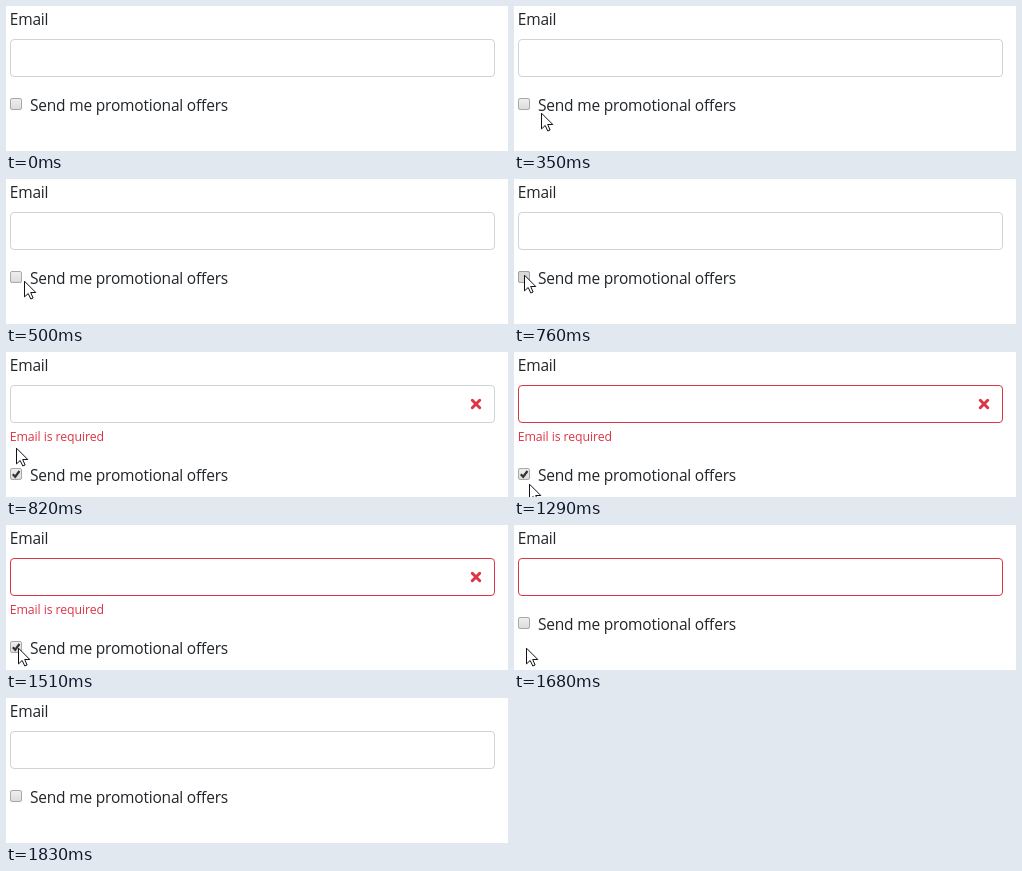
An HTML page that plays this animation: 502x145 px, repeating every 2.67 s.

```html
<!DOCTYPE html>
<html lang="en">
<head>
<meta charset="utf-8">
<title>Email form</title>
<style>
  html, body { margin: 0; width: 100%; height: 100%; overflow: hidden; background: #fff; }
  svg { display: block; width: 502px; height: 145px; }
  text { font: 15.5px "Open Sans", "Noto Sans", sans-serif; letter-spacing: -.2px; fill: #212529; }
  .error text { font-size: 12.3px; letter-spacing: -.1px; fill: #dc3545; }
  .field { fill: #fff; stroke: #ced4da; }
  .cross { stroke: #dc3545; stroke-width: 3; stroke-linecap: round; }
  .box { fill: url(#face); stroke: #a9a9a9; }
  .tick { fill: none; stroke: #333; stroke-width: 2.2; }
  .pointer path { fill: #fff; stroke: #101018; stroke-linejoin: miter; }

  .field, .error, .row, .tick, .pressed, .pointer {
    animation: 2670ms step-end infinite;
  }
  .field { animation-name: border; }
  .error, .tick { animation-name: invalid; }
  .row { animation-name: shift; }
  .pressed { animation-name: press; }
  .pointer { animation-name: move; }

  @keyframes border {
    0% { stroke: #ced4da; }
    33.33% { stroke: #d67c88; }
    36.32% { stroke: #dc3545; }
    65.54% { stroke: #d67c88; }
    68.53%, 100% { stroke: #ced4da; }
  }
  @keyframes invalid {
    0% { visibility: hidden; }
    30.71% { visibility: visible; }
    62.92%, 100% { visibility: hidden; }
  }
  @keyframes shift {
    0% { transform: none; }
    30.71% { transform: translateY(24px); }
    62.92%, 100% { transform: none; }
  }
  @keyframes press {
    0% { visibility: hidden; }
    28.46% { visibility: visible; }
    30.71%, 100% { visibility: hidden; }
  }
  @keyframes move {
    0% { transform: translate(72px, 150px); }
    4.49% { transform: translate(71px, 138px); }
    7.49% { transform: translate(56px, 128px); }
    10.11% { transform: translate(40px, 116px); }
    13.1% { transform: translate(27px, 106px); }
    16.1% { transform: translate(18px, 101px); }
    19.1% { transform: translate(12px, 97px); }
    22.09% { transform: translate(10px, 95px); }
    39.32% { transform: translate(10px, 100px); }
    42.32% { transform: translate(13px, 117px); }
    44.94% { transform: translate(16px, 132px); }
    48.31% { transform: translate(15px, 131px); }
    51.31% { transform: translate(9px, 127px); }
    53.93% { transform: translate(8px, 124px); }
    56.55% { transform: translate(12px, 122px); }
    68.53%, 100% { transform: translate(72px, 150px); }
  }
</style>
</head>
<body>
<svg viewBox="0 0 502 145">
  <defs>
    <linearGradient id="face" x2="0" y2="1">
      <stop stop-color="#efefef"/>
      <stop offset="1" stop-color="#dcdcdc"/>
    </linearGradient>
  </defs>

  <text x="3.8" y="19">Email</text>
  <rect class="field" x="4.5" y="33.5" width="484" height="37" rx="3.5"/>

  <g class="error">
    <path class="cross" d="M466.3 48.3l7.4 7.4m0-7.4l-7.4 7.4"/>
    <text x="3.8" y="89">Email is required</text>
  </g>

  <g class="row">
    <rect class="box" x="4.5" y="92.5" width="11" height="11" rx="1.5"/>
    <rect class="pressed" x="4.5" y="92.5" width="11" height="11" rx="1.5" fill="#d8d8d8" stroke="#a0a0a0"/>
    <path class="tick" d="M6.8 98.2l2.4 2.5 4.3-5.7"/>
    <text x="24" y="105">Send me promotional offers</text>
  </g>

  <g class="pointer">
    <path d="M.5 1.2V16.9L4.2 13.5 6.8 19 9.1 18 6.7 12.5H11.8Z"/>
  </g>
</svg>
</body>
</html>
```
